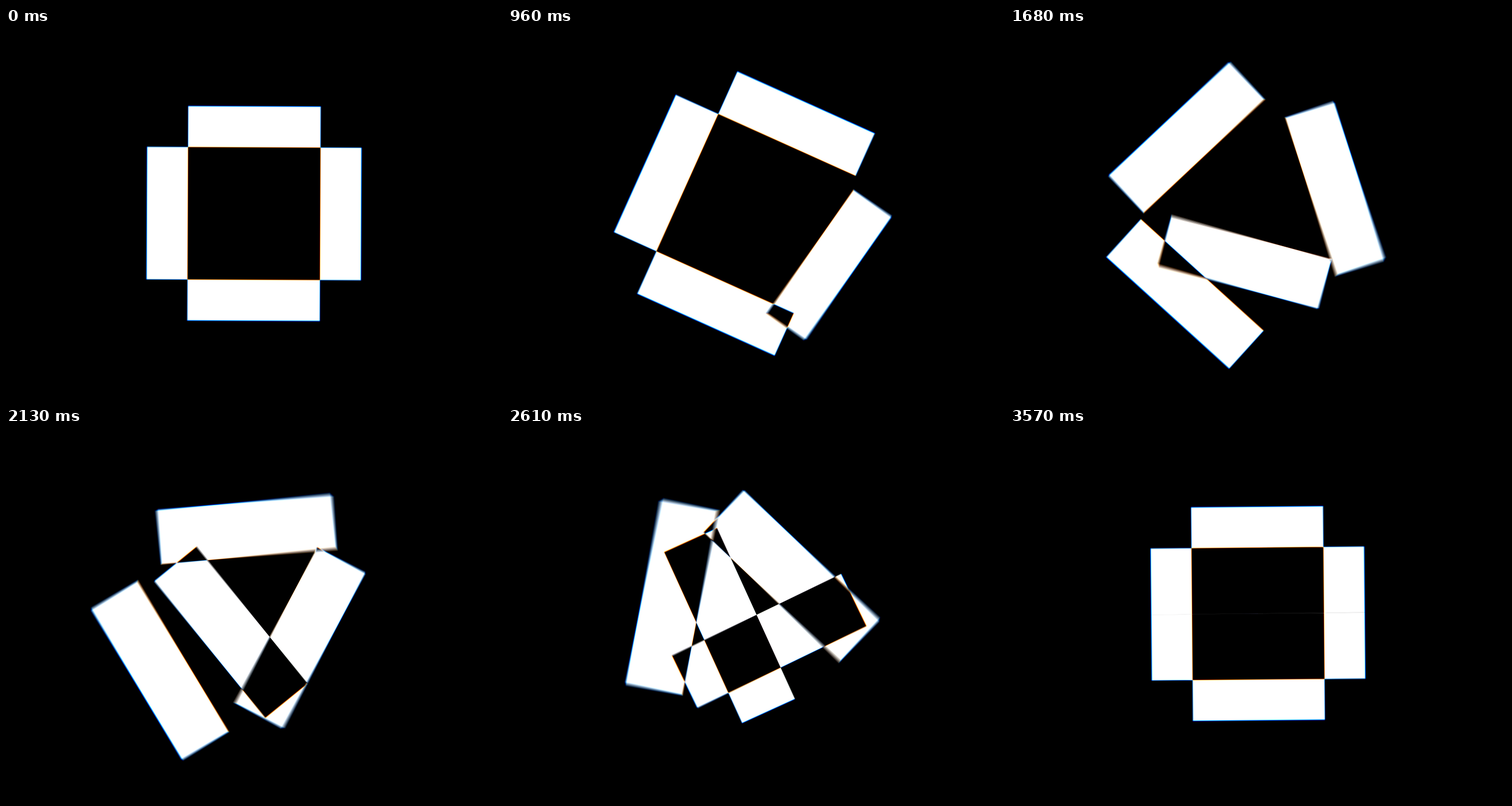
Write an HTML page with a canvas that moves like this. It is 864 px wide and 648 px high and loops after 3.6 s.

```html
<!DOCTYPE html>
<html lang="en">
<head>
<meta charset="utf-8">
<title>Golden bars</title>
<style>
  html, body { margin: 0; width: 100%; height: 100%; overflow: hidden; background: #000; }
  canvas { display: block; }
</style>
</head>
<body>
<canvas width="864" height="648"></canvas>
<script>
const ctx = document.querySelector('canvas').getContext('2d');
const LOOP = 3600, SHUTTER = 18, SAMPLES = 5;
const CX = 432, CY = 323.2;
const PHI = (1 + Math.sqrt(5)) / 2;
const LENGTH = 230.5, WIDTH = LENGTH / (2 * PHI);
const START = 600, MOVE = 3000 / 1.75, STAGGER = MOVE / 4;

// Each colour channel is scaled a little differently, giving fringed edges.
const level = 255 / SAMPLES;
const CHANNELS = [
  { color: `rgb(${level},0,0)`, zoom: 0.996 },
  { color: `rgb(0,${level},0)`, zoom: 1 },
  { color: `rgb(0,0,${level})`, zoom: 1.004 }
];

function smoothstep(u) {
  u = Math.min(1, Math.max(0, u));
  return u * u * (3 - 2 * u);
}

// Four bars swing a quarter turn inwards, one after the other.
function barsPath(t) {
  const path = new Path2D();
  for (let i = 0; i < 4; i++) {
    const p = smoothstep((t - START - i * STAGGER) / MOVE);
    const distance = WIDTH / 2 + (1 - p) * LENGTH / 2;
    const bar = new Path2D();
    bar.rect(distance - WIDTH / 2, -LENGTH / 2, WIDTH, LENGTH);
    path.addPath(bar, new DOMMatrix().rotate(90 * (p - i)));
  }
  return path;
}

function drawSample(time) {
  const t = time % LOOP, path = barsPath(t);
  for (const { color, zoom } of CHANNELS) {
    const scale = zoom * PHI ** (t / LOOP);
    ctx.setTransform(scale, 0, 0, scale, CX, CY);
    ctx.rotate(t / LOOP * Math.PI / 2);
    ctx.fillStyle = color;
    ctx.fill(path, 'evenodd');
  }
}

function draw(now) {
  ctx.resetTransform();
  ctx.globalCompositeOperation = 'source-over';
  ctx.fillStyle = '#000';
  ctx.fillRect(0, 0, 864, 648);
  // Motion blur: add up several moments within the shutter time.
  ctx.globalCompositeOperation = 'lighter';
  for (let s = 0; s < SAMPLES; s++) drawSample(now + s * SHUTTER / (SAMPLES - 1));
  requestAnimationFrame(draw);
}
requestAnimationFrame(draw);
</script>
</body>
</html>
```
